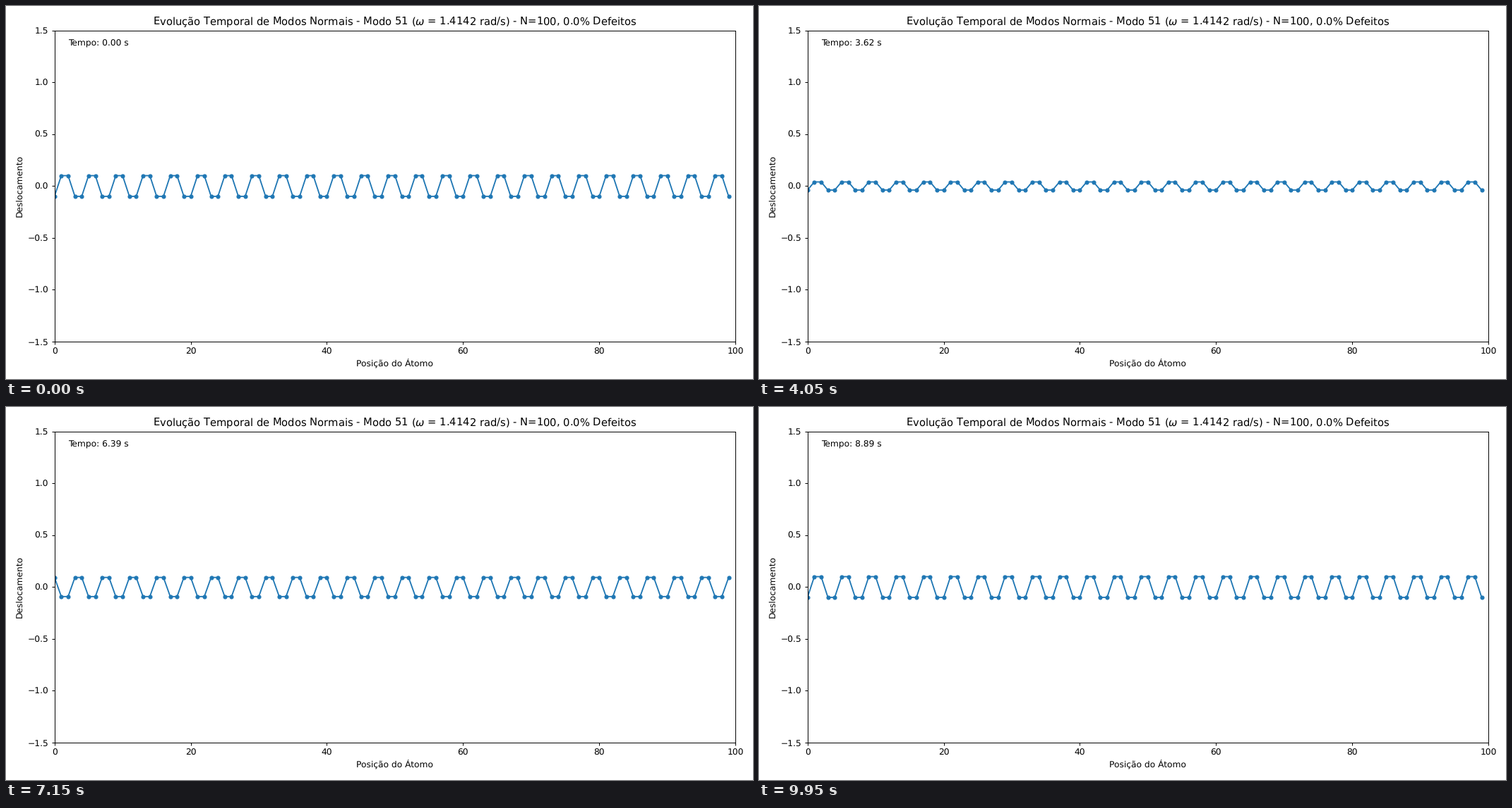
Recreate the animation shown at these times as a matplotlib script. Size 1058 by 529 pixels, loop 10000 ms.

```python
import numpy as np
import matplotlib.pyplot as plt
from matplotlib.animation import FuncAnimation

plt.rcParams["font.family"] = "DejaVu Sans"

N = 100
MODE = 51
FRAMES = 200
OMEGA = np.sqrt(2)
AMP = 0.1
DPI = 1058 / 12

atoms = np.arange(N)
# Signs - + + - repeat along the chain
shape = np.where(np.isin(atoms % 4, (0, 3)), -AMP, AMP)
times = np.linspace(0, 4 * np.pi / OMEGA, FRAMES)

fig, ax = plt.subplots(figsize=(12, 6), dpi=DPI)
line, = ax.plot(atoms, shape, "o-", color="#1f77b4", markersize=4)
ax.set_xlim(0, N)
ax.set_ylim(-1.5, 1.5)
ax.set_xlabel("Posição do Átomo")
ax.set_ylabel("Deslocamento")
ax.set_title(f"Evolução Temporal de Modos Normais - Modo {MODE} "
             rf"($\omega$ = {OMEGA:.4f} rad/s) - N={N}, 0.0% Defeitos")
clock = ax.text(0.02, 0.95, "", transform=ax.transAxes)

# Margins are worked out at 100 dpi, then kept as fractions of the figure
fig.dpi = 100
fig.tight_layout()
fig.dpi = DPI

# Unhinted glyphs keep the true text widths at this resolution
plt.rcParams["text.hinting"] = "none"


def update(i):
    t = times[i]
    line.set_ydata(shape * np.cos(OMEGA * t))
    clock.set_text(f"Tempo: {t:.2f} s")
    return line, clock


anim = FuncAnimation(fig, update, frames=FRAMES, interval=50, repeat=True)
plt.show()
```
